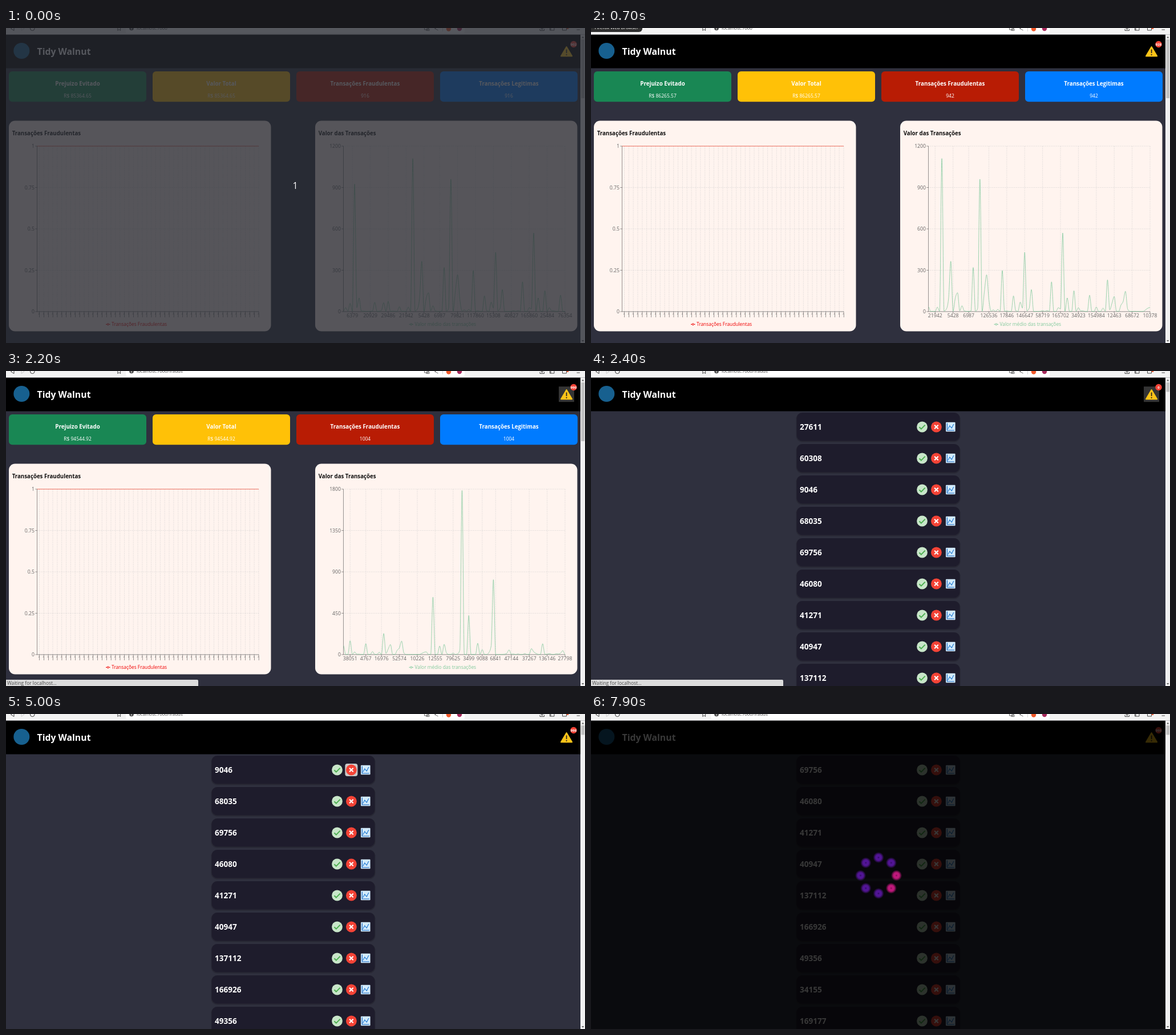
Animation, 1015 px wide and 552 px high, one loop 8000 ms. Source, as an HTML page:

```html
<!DOCTYPE html>
<html lang="pt">
<head>
<meta charset="utf-8">
<title>Painel de transações</title>
<style>
html, body { margin: 0; width: 100%; height: 100%; overflow: hidden; background: #2f303e; }
svg { display: block; width: 100%; height: 100%; font-family: "Open Sans", "Noto Sans", sans-serif; }
</style>
</head>
<body>
<svg viewBox="0 0 1015 552" xmlns="http://www.w3.org/2000/svg">
  <defs>
    <g id="ok">
      <circle r="9.4" fill="#c8e6c9"/>
      <path d="M-5 .3L-1.7 3.6L5.2 -3.4" fill="none" stroke="#4caf50" stroke-width="2"/>
    </g>
    <g id="no">
      <circle r="9.4" fill="#f44336"/>
      <path d="M-3.3 -3.3L3.3 3.3M3.3 -3.3L-3.3 3.3" stroke="#fff" stroke-width="2.1"/>
    </g>
    <g id="plot">
      <rect x="-8.3" y="-8.3" width="16.6" height="16.6" rx="1" fill="#d3ebfc"/>
      <path d="M-6 -6.5V6H6.5" fill="none" stroke="#1565c0" stroke-width="1.2"/>
      <path d="M-4.5 3.5L-1.5 -2L2 2L5.5 -5" fill="none" stroke="#1976d2" stroke-width="1.1"/>
    </g>
    <radialGradient id="violet">
      <stop offset="0" stop-color="#320b62"/><stop offset=".25" stop-color="#53159a"/>
      <stop offset=".55" stop-color="#501490"/><stop offset="1" stop-color="#501490" stop-opacity="0"/>
    </radialGradient>
    <radialGradient id="pink">
      <stop offset="0" stop-color="#7c1054"/><stop offset=".25" stop-color="#c4197e"/>
      <stop offset=".55" stop-color="#b81777"/><stop offset="1" stop-color="#b81777" stop-opacity="0"/>
    </radialGradient>
  </defs>
  <g id="stage"></g>
</svg>
<script>
const LOOP = 8000, STEP = 100;
const stage = document.getElementById('stage');

// The largest transactions, by index; the rest are seeded
const peaks = {
  823: 925, 849: 1110, 853: 365, 863: 320, 866: 960, 869: 267, 876: 298, 886: 430,
  898: 216, 903: 570, 923: 230, 945: 625, 958: 1785, 961: 425, 972: 815
};
const queue = [27611, 60308, 9046, 68035, 69756, 46080, 41271, 40947, 137112, 166926, 49356, 34155, 169177];
const removals = [3600, 5000, 5800, 6300];

// Where the pointer rests: from time, button, row
const pointer = [
  [0], [3100, 'no', 0], [3200, 'ok', 0], [3900], [4100, 'no', 1], [4500],
  [4600, 'no', 0], [5300], [5400, 'ok', 0], [6000], [6100, 'no', 0], [6600]
];

const noise = k => { const s = Math.sin(k * 127.1) * 43758.5453; return s - Math.floor(s); };
const valueAt = k => peaks[k] || 2 + 160 * noise(k) ** 6;
const idAt = k => String(Math.floor(3000 + 165000 * noise(k + .5) ** 1.5));

const rect = (x, y, w, h, fill, r = 0, extra = '') =>
  `<rect x="${x}" y="${y}" width="${w}" height="${h}" rx="${r}" fill="${fill}" ${extra}/>`;
const line = (d, stroke, w = .6, extra = '') =>
  `<path d="${d}" fill="none" stroke="${stroke}" stroke-width="${w}" ${extra}/>`;
const dot = (x, y, r, fill) => `<circle cx="${x}" cy="${y}" r="${r}" fill="${fill}"/>`;
const text = (x, y, s, size, fill, anchor = 'start', weight = 400) =>
  `<text x="${x}" y="${y}" font-size="${size}" fill="${fill}" text-anchor="${anchor}" font-weight="${weight}">${s}</text>`;

// Piecewise linear through [time, value] points, extended past the last one
function track(t, pts) {
  let i = 1;
  while (i < pts.length - 1 && t > pts[i][0]) i++;
  const [a, b] = [pts[i - 1], pts[i]];
  return a[1] + (b[1] - a[1]) * (t - a[0]) / (b[0] - a[0]);
}

function monotone(xs, ys) {
  const h = xs[1] - xs[0], n = xs.length;
  const s = i => (ys[i + 1] - ys[i]) / h;
  const m = ys.map((_, i) => {
    if (i === 0 || i === n - 1) return 0;
    const a = s(i - 1), b = s(i);
    return (Math.sign(a) + Math.sign(b)) * Math.min(Math.abs(a), Math.abs(b), Math.abs(a + b) / 4);
  });
  const f = v => v.toFixed(2);
  let d = `M${f(xs[0])} ${f(ys[0])}`;
  for (let i = 1; i < n; i++) {
    d += `C${f(xs[i - 1] + h / 3)} ${f(ys[i - 1] + m[i - 1] * h / 3)} ` +
         `${f(xs[i] - h / 3)} ${f(ys[i] - m[i] * h / 3)} ${f(xs[i])} ${f(ys[i])}`;
  }
  return d;
}

const TOP = 207, BOTTOM = 497, WIDTH = 388.5, GAP = WIDTH / 99;

function panel(x, title, legend, color, legendX) {
  return rect(x, 162.5, 459.5, 369, '#fff4ef', 11) +
    text(x + 5.7, 187.6, title, 9.7, '#111', 'start', 700) +
    line(`M${legendX} 519.3h7.6`, color, 1) +
    `<circle cx="${legendX + 3.8}" cy="519.3" r="1.5" fill="#fff4ef" stroke="${color}"/>` +
    text(legendX + 10, 522, legend, 8.4, color);
}

function axes(x0, ticks, yLabels) {
  let grid = '', marks = `M${x0} ${TOP}V${BOTTOM}H${x0 + WIDTH}`, labels = '';
  yLabels.forEach((s, i) => {
    const y = BOTTOM - i * 72.5;
    grid += `M${x0} ${y}h${WIDTH}`;
    marks += `M${x0 - 3.2} ${y}h3.2`;
    labels += text(x0 - 4.5, y + 3.1, s, 8.7, '#666', 'end');
  });
  for (const [x, s] of ticks) {
    grid += `M${x} ${TOP}V${BOTTOM}`;
    marks += `M${x} ${BOTTOM}v3.2`;
    labels += text(x, 507.2, s, 8.7, '#666', 'middle');
  }
  return line(grid, '#ccc', .6, 'stroke-dasharray="1.6 1.6"') + line(marks, '#666', .7) + labels;
}

function fraudChart() {
  const x0 = 54.5, ticks = [];
  for (let i = 1; i < 100; i += 2) ticks.push([x0 + i * GAP, '1']);
  return panel(5, 'Transações Fraudulentas', 'Transações Fraudulentas', '#f00000', 175) +
    axes(x0, ticks, [0, .25, .5, .75, 1]) +
    line(`M${x0} ${TOP}h${WIDTH}`, '#f0503c', .8);
}

// Labels are placed from the right, skipping any that would touch
function valueTicks(x0, last) {
  const ticks = [];
  let prevX = Infinity, prevW = 0;
  for (let k = last; k > last - 97; k--) {
    const x = x0 + (k - last + 99) * GAP, id = idAt(k), w = id.length * 5;
    if (prevX - x < (w + prevW) / 2 + 2.6) continue;
    ticks.push([x, id]);
    prevX = x;
    prevW = w;
  }
  return ticks;
}

function valueChart(last) {
  const x0 = 591.5;
  const xs = Array.from({ length: 100 }, (_, i) => x0 + i * GAP);
  const vals = xs.map((_, i) => valueAt(last - 99 + i));
  const max = Math.max(...vals) > 1200 ? 1800 : 1200;
  const ys = vals.map(v => BOTTOM - v / max * (BOTTOM - TOP));
  return panel(542, 'Valor das Transações', 'Valor médio das transações', '#82ca9d', 706.5) +
    axes(x0, valueTicks(x0, last), [0, 1, 2, 3, 4].map(i => i * max / 4)) +
    line(monotone(xs, ys), '#82ca9d', .8);
}

function dashboard(t, total) {
  const count = Math.round(total);
  const money = 'R$ ' + track(t, [[0, 85364.65], [700, 86265.57], [1600, 91233.18]]).toFixed(2);
  const cards = [
    ['Prejuizo Evitado', money, '#198754'], ['Valor Total', money, '#ffc107'],
    ['Transações Fraudulentas', count, '#b81c04'], ['Transações Legitimas', count, '#007bff']
  ];
  return cards.map(([title, value, fill], i) => {
    const x = 5 + i * 252, mid = x + 120.5;
    return rect(x, 76, 241, 53.3, fill, 6) +
      text(mid, 101.2, title, 9.8, '#fff', 'middle', 700) +
      text(mid, 122, value, 8.5, '#fff', 'middle');
  }).join('') + fraudChart() + valueChart(Math.ceil(total));
}

function list(t) {
  const first = removals.filter(at => t >= at).length;
  const [, button, row] = pointer.findLast(p => t >= p[0]);
  let out = '';
  for (let i = 0; i < 9; i++) {
    const y = 98 + i * 55;
    out += rect(359.5, y - 25, 288, 51.5, '#282834', 11) +
      rect(360.5, y - 25, 286, 49.5, '#1e1c2c', 10) +
      text(366, y + 5, queue[first + i], 13.6, '#fff', 'start', 700);
    ['ok', 'no', 'plot'].forEach((id, j) => {
      const x = 580.5 + j * 24.9;
      if (id === button && i === row) out += rect(x - 11, y - 11, 22, 22, '#c9c9c9', 4);
      out += `<use href="#${id}" x="${x}" y="${y}"/>`;
    });
  }
  return out;
}

function browser(t, listed) {
  const ink = '#4a4a4a';
  const url = 'localhost:7000' + (t >= 2000 ? '/frauds' : '');
  return rect(0, 0, 1015, 11.5, '#f3f3f3') + rect(210, -12, 594, 21, '#fff', 3) +
    line('M14 -3L8.5 1L14 4.5Z', ink, 1) + line('M27 -3L32 1L27 4.5Z', '#c4c4c4', .8) +
    line('M49.5 -1A3.7 3.7 0 1 1 43 -1', ink, 1.1) +
    line('M195.8 -2V4.5L198.2 2.5L200.6 4.5V-2', ink, 1) +
    dot(220, .5, 3.8, ink) + line('M220 -1V3', '#fff', .9) +
    text(229, 3.4, url, 8, ink) +
    line('M733.5 -2V3h6.5V-2M737 1.5h5v3h-5z', ink, .8) +
    line('M757.5 -2L751.5 1L757.5 4', ink, .8) + line('M765.5 0V6', '#bbb') +
    dot(776, 1.5, 4.2, '#f2592a') + dot(795, 1, 4.2, '#a72a5c') +
    line('M936 1.5V4.5h7.5V1.5M939.7 -2V2.5M937.5 .5L939.7 2.7L942 .5', ink, 1) +
    line('M953.5 -3h7.5V4h-7.5zM955 -3V4', ink, 1) +
    line('M975.5 -3V4h7V-1', ink, 1) + dot(984.5, 0, 2, '#e8552d') +
    line('M1000.5 -.5h5.5M1000.5 3h5.5', ink, 1) +
    rect(1007, 11.5, 8, 540.5, '#f1f1f1') + rect(1008.3, 20, 5.8, listed ? 16.5 : 103, '#c1c1c1') +
    `<path d="M1009 17.5h4.4l-2.2 -2.8zM1009 547h4.4l-2.2 2.8z" fill="#606060"/>`;
}

function navbar(t, badge) {
  return rect(0, 11.5, 1007, 59, '#000') + dot(27.3, 40, 14, '#17608f') +
    text(54.5, 46.6, 'Tidy Walnut', 15.8, '#fff', 'start', 700) +
    (t >= 1800 && t < 2800 ? rect(969, 27.2, 27, 27, '#343434') : '') +
    `<path d="M982.6 33L992.2 49.2H973Z" fill="#fcc419" stroke="#fcc419" stroke-width="2" stroke-linejoin="round"/>` +
    line('M982.6 37.5V44', '#222', 1.7) + dot(982.6, 46.8, 1.1, '#222') +
    dot(995, 28.5, 5.7, '#f44336') + text(995, 30.8, badge, 6, '#fff', 'middle', 700);
}

function loader(t) {
  const head = Math.floor((t - 7900) / STEP);
  let out = rect(0, 11.5, 1007, 540.5, '#000', 0, 'opacity=".78"');
  for (let i = 0; i < 8; i++) {
    const a = i * Math.PI / 4, lit = (i - head + 8) % 8 < 2;
    out += dot(504 + 31.5 * Math.cos(a), 283 + 31.5 * Math.sin(a), 9.6, `url(#${lit ? 'pink' : 'violet'})`);
  }
  return out;
}

function overlays(t) {
  let out = '';
  if (t >= 200 && t < 1000) {
    const fade = Math.min(1, (t - 100) / 200, (1000 - t) / 200);
    out += `<g opacity="${fade}">` + rect(-6, -12, 96, 19, '#2f2f2f', 6) +
      text(6.5, 1.6, 'Firefox Web Browser', 8, '#fff') + '</g>';
  }
  if (t >= 1900 && t < 2700) {
    out += rect(-3, 541, 340, 14, '#dcdcdc', 2) + text(2, 549.8, 'Waiting for localhost…', 8.4, '#4a4a4a');
  }
  if (t < 300) {
    out += `<g opacity="${(1 - t / 300) ** 2}">` + rect(0, 0, 1015, 552, '#272a31', 0, 'opacity=".78"') +
      text(507, 281.6, '1', 16, '#fff', 'middle') + '</g>';
  }
  return out;
}

function render(t) {
  const listed = t >= 2400;
  const total = track(Math.min(t, 2200), [[0, 916.4], [700, 942], [1600, 979]]);
  const badge = t >= 2600 ? 998 : listed ? 0 : Math.round(total) - 14;
  stage.innerHTML = rect(0, 0, 1015, 552, '#2f303e') +
    (listed ? list(t) : dashboard(t, total)) + navbar(t, badge) +
    (t >= 7700 ? loader(t) : '') + browser(t, listed) + overlays(t);
}

const start = performance.now();
let shown = -1;
function tick() {
  const t = Math.floor((performance.now() - start) % LOOP / STEP) * STEP;
  if (t !== shown) render(shown = t);
  requestAnimationFrame(tick);
}
tick();
</script>
</body>
</html>
```
